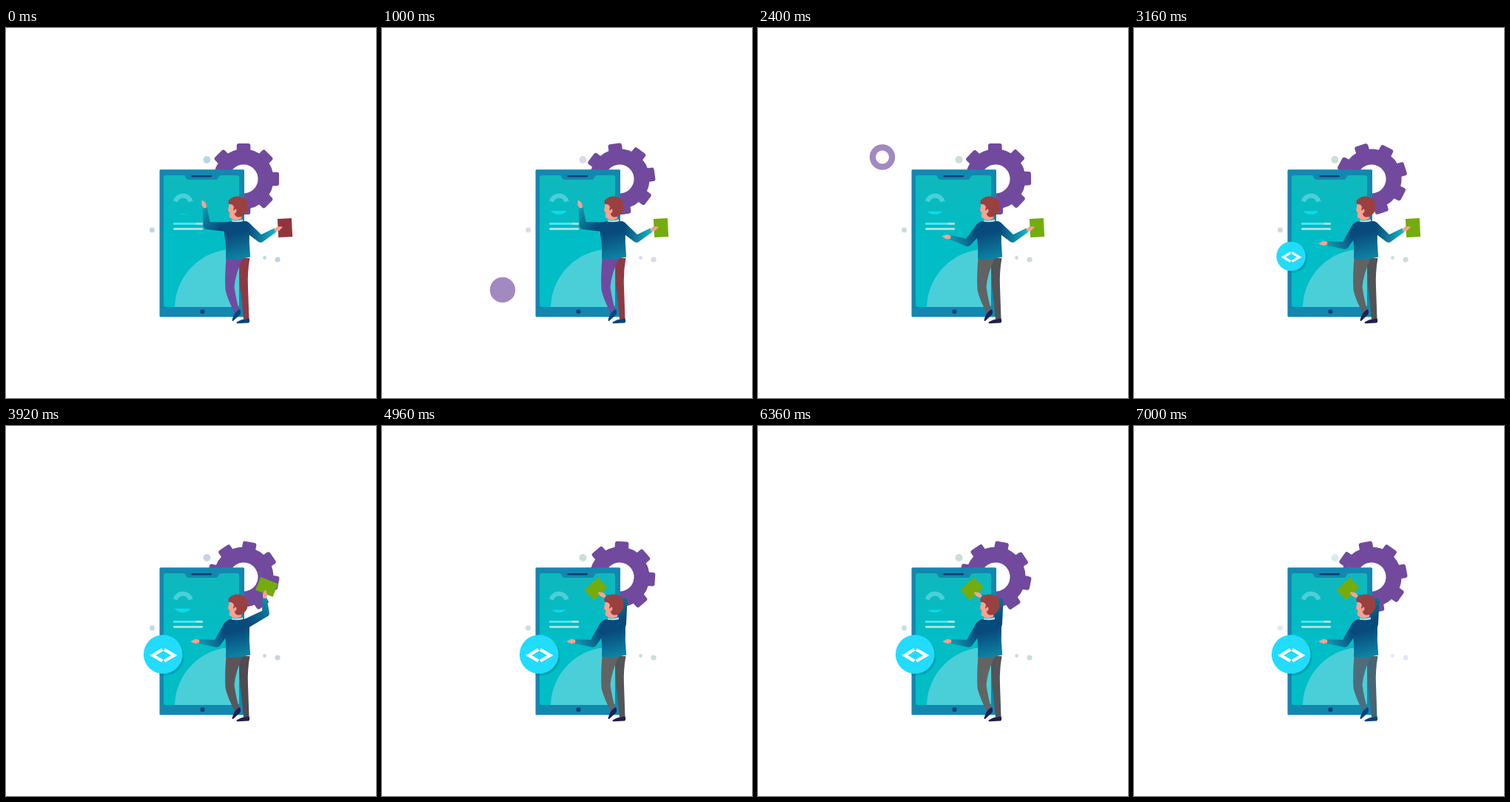
An HTML page for the animation above (7.04 s loop, 500 px wide and 500 px high).

```html
<!DOCTYPE html>
<html lang="en">
<head>
<meta charset="utf-8">
<title>App building</title>
<style>
  html, body { margin: 0; width: 100%; height: 100%; overflow: hidden; background: #fff; }
  svg { display: block; width: 100vw; height: 100vh; }
</style>
</head>
<body>
<svg viewBox="0 0 500 500">
  <defs>
    <linearGradient id="screenFill" x1="0" y1="0" x2="0" y2="1">
      <stop offset="0" stop-color="#0fb8bc"/><stop offset=".5" stop-color="#00bdc6"/>
    </linearGradient>
    <linearGradient id="torsoFill" gradientUnits="userSpaceOnUse" x1="308" y1="268" x2="320" y2="314">
      <stop offset=".2" stop-color="#084a7b"/><stop offset="1" stop-color="#0d89a8"/>
    </linearGradient>
    <linearGradient id="frontFill" gradientUnits="userSpaceOnUse">
      <stop offset=".2" stop-color="#084a7b"/><stop offset="1" stop-color="#1297b0"/>
    </linearGradient>
    <linearGradient id="backFill" gradientUnits="userSpaceOnUse">
      <stop offset=".1" stop-color="#084a7b"/><stop id="cuff" offset="1"/>
    </linearGradient>
    <clipPath id="screenClip"><rect x="213" y="199" width="102" height="178" rx="3"/></clipPath>
    <clipPath id="phoneClip"><rect x="207.5" y="191" width="114.5" height="199.5"/></clipPath>
    <clipPath id="levelClip"><rect id="level" x="220" width="40" height="20"/></clipPath>
  </defs>

  <g id="dots">
    <circle cx="271.5" cy="178" r="5"/><circle cx="197.5" cy="273" r="3.5"/>
    <circle cx="367" cy="313" r="3.6"/><circle cx="349.5" cy="310.5" r="2.4"/>
  </g>
  <g id="gear" fill="#714a9e"><circle r="30" fill="none" stroke="#714a9e" stroke-width="21"/></g>
  <circle id="bubble" fill="none" stroke="#714a9e" opacity=".65"/>

  <rect x="207.5" y="191.3" width="114.5" height="199.2" rx="1.5" fill="#1287b0"/>
  <g clip-path="url(#screenClip)">
    <rect x="213" y="199" width="102" height="178" fill="url(#screenFill)"/>
    <circle cx="308" cy="379" r="80" fill="#4acfd9"/>
  </g>
  <path d="M239 198.5Q242 199 243 202Q244 205 247 205H283Q286 205 287 202Q288 199 291 198.5Z" fill="#1287b0"/>
  <rect x="250.5" y="199" width="27.5" height="2.4" rx="1.2" fill="#0b3f72"/>
  <circle cx="265.5" cy="383.2" r="3" fill="#0b3f72"/>
  <path d="M229 234.5A10.6 10.6 0 0 1 249.5 234.5" fill="none" stroke="#4acfd9" stroke-width="6.2"/>
  <circle cx="239" cy="237.5" r="14.5" fill="#08dcea" clip-path="url(#levelClip)"/>
  <g fill="none" stroke-width="3" stroke-linecap="round">
    <path d="M227.5 264.6H264.8M227.5 271.4H264.8" stroke="#a9dedd"/>
    <path d="M227.5 264.6H255.5" stroke="#45e6f1"/>
  </g>

  <g clip-path="url(#phoneClip)"><circle id="shade" cx="214.5" cy="311" fill="#075f75" opacity=".25"/></g>
  <g id="disc">
    <circle r="26.3" fill="#22dcfd"/>
    <path d="M-.8-6.5-14 1.5-.8 9M1.8-6.5 15 1.5 1.8 9" fill="none" stroke="#fff" stroke-width="4.2"/>
  </g>

  <rect id="card" x="-9.5" y="-12.6" width="19" height="25.2"/>
  <path id="backArm" fill="url(#backFill)"/>
  <g id="backHand" class="hand"></g>

  <path id="farLeg" d="M315 311H329.5Q326 330 327 350L328.5 393.5H321Q319 370 316.5 352Q315 335 315 311Z"/>
  <path id="nearLeg" d="M297.5 311H320Q310 332 308.5 350Q311 368 315.5 382L309 385Q299 366 296.5 354Q295.500 335 297.5 311Z"/>
  <g id="shoes">
    <path d="M310.5 384 315.500 380Q318 382 316.5 387L308 395Q306 397 305.500 395Q307 388 310.5 384Z"/>
    <path d="M321 393.500 328.500 392.500Q330 397 328 398.500L313 399.3Q310 399 312.500 397Q317 394 321 393.500Z"/>
  </g>
  <path d="M304 261H319Q328 261 329 270Q328 290 330.200 309.500Q314 314 297 312Q298 295 295 278Q294 262 304 261Z" fill="url(#torsoFill)"/>
  <path d="M305 259.500Q312 262 320 258.500V261.300Q312 263 305 261.500Z" fill="#cbe3ef"/>
  <path d="M302 235 300 247 302 248.500 302 256Q306 258 306.500 259Q312 261 318 258V236Z" fill="#f8a291"/>
  <path d="M301.500 238Q298.500 234 303 231Q307 227 314 227.500Q327 229 326.500 241Q327 247 323 251Q319 256 313 255.500Q309 254 309 250.500Q308 249 308.500 247Q306 246 308 243Q308 238 301.500 238Z" fill="#9a4040"/>
  <ellipse cx="309.700" cy="247.500" rx="1.700" ry="2.800" transform="rotate(18 309.700 247.500)" fill="#f8a291"/>

  <path id="frontArm" fill="url(#frontFill)"/>
  <g id="frontHand" class="hand"></g>
</svg>
<script>
const LOOP = 7040;
const $ = id => document.getElementById(id);
const set = (id, attrs) => { for (const k in attrs) $(id).setAttribute(k, attrs[k]); };
const clamp = (t, a, b) => Math.min(1, Math.max(0, (t - a) / (b - a)));
const ease = (t, a, b) => (1 - Math.cos(Math.PI * clamp(t, a, b))) / 2;
const mix = (a, b, p) => a + (b - a) * p;
const mixPoint = (a, b, p) => a.map((v, i) => mix(v, b[i], p));

for (let a = 0; a < 360; a += 45)
  $('gear').innerHTML += `<rect x="-9.300" y="-48" width="18.600" height="13" rx="3" transform="rotate(${a})"/>`;
for (const hand of document.querySelectorAll('.hand'))
  hand.innerHTML = '<path d="M-1-2 4-3.200Q8-2.500 10.500-.8Q10 1 7 1.300Q6 3 3.500 2.800L-1 2Z" fill="#f8a291"/>';

// time, dots, near leg, far leg, shoes, card
const looks = [
  [0, '#bad7e3', '#714aa0', '#8f3a42', '#084577', '#90353c'],
  [680, '#dcd9e9', '#714aa0', '#8f3a42', '#084577', '#74ac0e'],
  [1480, '#cbded9', '#606263', '#515355', '#22204f', '#74ac0e'],
  [3200, '#c7d5e4', '#5b5559', '#504b50', '#22204f', '#74ac0e'],
  [4440, '#cadeda', '#626464', '#535556', '#22204f', '#74ac0e'],
  [6680, '#dfe9f5', '#4d6d7c', '#476575', '#084577', '#74ac0e']
];

// time, x, y
const route = [
  [0, 228, 372], [360, 205, 387], [720, 167, 388], [1000, 163, 354], [1440, 144, 300],
  [1760, 119, 250], [2160, 163, 188], [2400, 168, 174.5], [2880, 193, 214], [3100, 235, 228]
];

const levels = [[0, 251.2], [700, 247], [2400, 247.7], [3920, 246.7], [4960, 248.5], [6400, 248.5], [6800, 253], [LOOP, 253]];

function span(keys, t) {
  let i = 0;
  while (i < keys.length - 2 && t >= keys[i + 1][0]) i++;
  return i;
}

function alongRoute(t) {
  const i = span(route, t), a = route[i], b = route[i + 1];
  const dt = b[0] - a[0], u = clamp(t, a[0], b[0]), v = 1 - u;
  const slope = (j, c) => {
    const p = route[Math.max(j - 1, 0)], n = route[Math.min(j + 1, route.length - 1)];
    return (n[c] - p[c]) / (n[0] - p[0]) * dt;
  };
  return [1, 2].map(c => v * v * (1 + 2 * u) * a[c] + u * v * v * slope(i, c)
    + u * u * (3 - 2 * u) * b[c] - u * u * v * slope(i + 1, c));
}

// smooth curve through a at 0, b at 1/2 and c at 1
const through = (a, b, c, p) => a.map((v, i) =>
  v * (1 - p) * (1 - 2 * p) + 4 * b[i] * p * (1 - p) + c[i] * p * (2 * p - 1));

function taper([ax, ay], [bx, by], ra, rb) {
  const d = Math.hypot(bx - ax, by - ay), nx = (ay - by) / d, ny = (bx - ax) / d;
  return `M${ax + nx * ra} ${ay + ny * ra}L${bx + nx * rb} ${by + ny * rb}`
    + `L${bx - nx * rb} ${by - ny * rb}L${ax - nx * ra} ${ay - ny * ra}Z`;
}
const bead = ([x, y], r) => `M${x - r} ${y}a${r} ${r} 0 1 0 ${2 * r} 0a${r} ${r} 0 1 0 ${-2 * r} 0Z`;

function drawArm(name, shoulder, elbow, wrist, turn) {
  const angle = Math.atan2(wrist[1] - elbow[1], wrist[0] - elbow[0]) * 180 / Math.PI + turn;
  set(name + 'Arm', { d: bead(shoulder, 6.5) + taper(shoulder, elbow, 6.5, 5) + bead(elbow, 5) + taper(elbow, wrist, 5, 2.8) });
  set(name + 'Fill', { x1: shoulder[0], y1: shoulder[1], x2: wrist[0], y2: wrist[1] });
  set(name + 'Hand', { transform: `translate(${wrist}) rotate(${angle})` });
}

function draw(t) {
  const [, dots, near, far, shoes, card] = looks.filter(l => l[0] <= t).pop();
  set('dots', { fill: dots });
  set('nearLeg', { fill: near });
  set('farLeg', { fill: far });
  set('shoes', { fill: shoes });

  set('gear', { transform: `translate(321 204) rotate(${t * 0.0371})` });

  const [x, y] = alongRoute(t), hole = 9 * ease(t, 1500, 2000);
  set('bubble', { cx: x, cy: y, r: (17.2 + hole) / 2, 'stroke-width': 17.2 - hole, visibility: t < 3100 ? 'visible' : 'hidden' });

  const i = span(levels, t), a = levels[i], b = levels[i + 1];
  set('level', { y: mix(a[1], b[1], clamp(t, a[0], b[0])) });

  const pop = 1 - (1 - clamp(t, 2960, 3500)) ** 3;
  set('disc', { transform: `translate(212.200 308.500) scale(${pop})` });
  set('shade', { r: 26.3 * pop });

  const lift = ease(t, 3480, 4360);
  const place = through([377, 270], [352.5, 217.5], [289, 220], lift);
  set('card', { fill: card, transform: `translate(${place}) rotate(${-3 - 130 * lift})` });
  set('cuff', { 'stop-color': lift < .5 ? '#13b3c6' : '#0f8ea8' });
  drawArm('back', [323.5, 267.5],
    through([344, 285], [351, 253], [326.5, 237], lift),
    through([364, 273], [349.5, 232], [301, 230], lift),
    mix(10, 18, lift));

  const drop = ease(t, 1400, 2720);
  const elbow = mixPoint([271.5, 267], [285, 294], drop);
  const angle = mix(264, 187, drop) * Math.PI / 180;
  const wrist = [elbow[0] + 25 * Math.cos(angle), elbow[1] + 25 * Math.sin(angle)];
  drawArm('front', [301, 269], elbow, wrist, mix(-12, -6, drop));
}

function frame(now) {
  draw(now % LOOP);
  requestAnimationFrame(frame);
}
draw(0);
requestAnimationFrame(frame);
</script>
</body>
</html>
```
